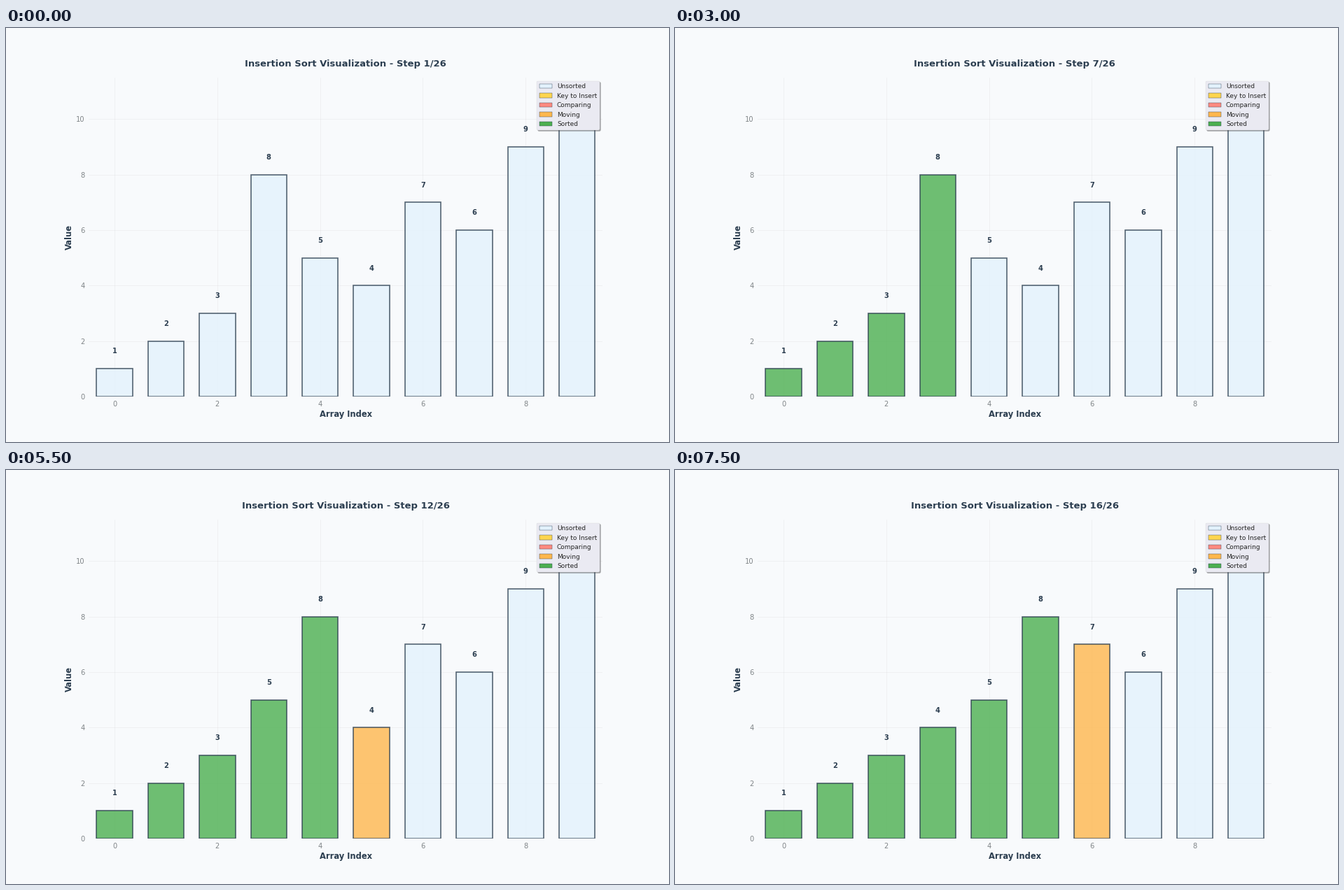
These frames come from a looping animation (947 by 592 pixels, 8000 ms). A matplotlib script:

```python
import matplotlib.pyplot as plt
from matplotlib.animation import FuncAnimation
from matplotlib.patches import Patch

W, H, DPI = 947, 592, 64
S = 59.2 / DPI  # point sizes are given for a 16 x 10 inch layout
SHOWN_STEPS, STEP_MS = 16, 500

INK, GREY, PAPER = "#2c3e50", "#7f8487", "#f8fafc"
COLORS = {
    "Unsorted": "#e3f2fd",
    "Key to Insert": "#ffd54f",
    "Comparing": "#ff8a80",
    "Moving": "#ffb74d",
    "Sorted": "#4caf50",
}
VALUES = [1, 2, 3, 8, 5, 4, 7, 6, 9, 10]


def insertion_steps(values):
    """Return (array, key, comparing, moving, sorted count) for each step."""
    a = list(values)
    steps = [(a[:], None, None, None, 0)]
    for i in range(1, len(a)):
        key, j = a[i], i - 1
        steps.append((a[:], i, None, None, 0))
        while j >= 0 and a[j] > key:
            steps.append((a[:], i, j, j + 1, i))
            a[j + 1] = a[j]
            j -= 1
        a[j + 1] = key
        steps.append((a[:], None, None, None, i + 1))
    steps.append((a[:], None, None, None, len(a)))
    return steps


def state_of(i, key, comparing, moving, done):
    if i < done:
        return "Sorted"
    if i == moving:
        return "Moving"
    if i == comparing:
        return "Comparing"
    if i == key:
        return "Key to Insert"
    return "Unsorted"


plt.rcParams.update({
    "font.family": "DejaVu Sans",
    "patch.linewidth": 0.3 * S,
    "axes.linewidth": 0,
    "toolbar": "None",
})

fig = plt.figure(figsize=(W / DPI, H / DPI), dpi=DPI, facecolor=PAPER)
ax = fig.add_axes([0.125, 0.11, 0.775, 0.77], facecolor=PAPER)
ax.set(xlim=(-0.5, 9.5), ylim=(0, 11.5),
       xticks=range(0, 10, 2), yticks=range(0, 11, 2))
for spine in ax.spines.values():
    spine.set_visible(False)
ax.set_axisbelow(True)
ax.grid(True, color="#cccccc", alpha=0.3, linewidth=0.8 * S)
ax.tick_params(length=0, pad=7 * S, labelsize=12 * S, labelcolor=GREY)

bold = dict(fontweight="bold", color=INK)
ax.set_xlabel("Array Index", fontsize=14 * S, labelpad=4 * S, **bold)
ax.set_ylabel("Value", fontsize=14 * S, labelpad=4 * S, **bold)
title = ax.set_title("", fontsize=16 * S, pad=20 * S, **bold)

bars = ax.bar(range(len(VALUES)), VALUES, width=0.7, alpha=0.8,
              edgecolor=INK, linewidth=2 * S)
labels = [ax.text(i, 0, "", ha="center", va="bottom", fontsize=12 * S, **bold)
          for i in range(len(VALUES))]

ax.legend(
    handles=[Patch(facecolor=c, edgecolor=INK, linewidth=0.5 * S, label=name)
             for name, c in COLORS.items()],
    loc="upper right", fontsize=11 * S, labelcolor="0.15",
    frameon=True, fancybox=True, framealpha=1,
    facecolor="#eaeaf2", edgecolor="0.8",
    shadow={"ox": 2 * S, "oy": -2 * S},
)

STEPS = insertion_steps(VALUES)


def update(n):
    array, *marks = STEPS[n]
    for i, (bar, label, value) in enumerate(zip(bars, labels, array)):
        bar.set_height(value)
        bar.set_facecolor(COLORS[state_of(i, *marks)])
        label.set_text(str(value))
        label.set_y(value + 0.5)
    title.set_text(f"Insertion Sort Visualization - Step {n + 1}/{len(STEPS)}")
    return [title, *bars, *labels]


anim = FuncAnimation(fig, update, frames=SHOWN_STEPS, interval=STEP_MS,
                     repeat=True, repeat_delay=0, blit=False)
plt.show()
```
